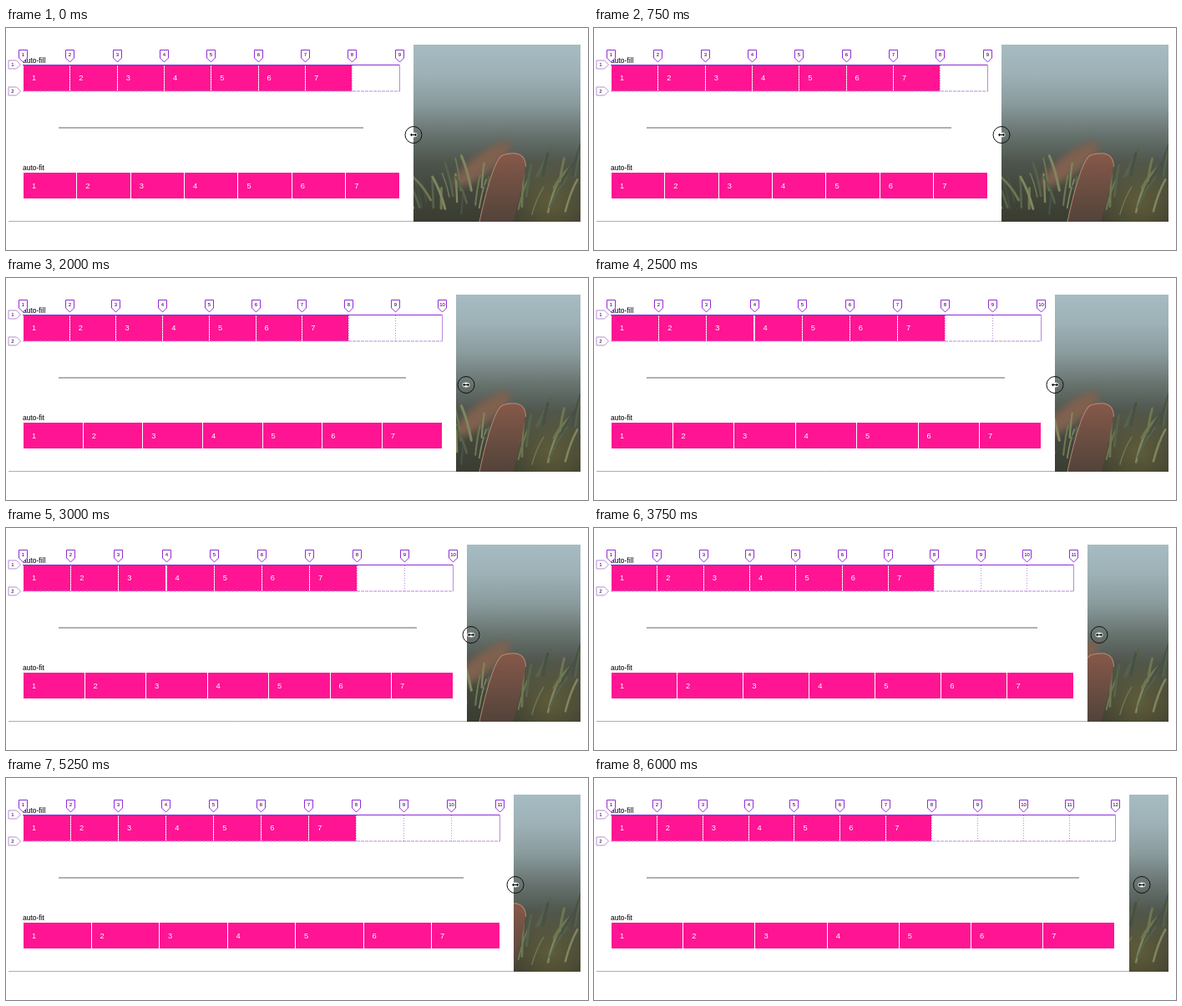
Recreate the animation shown at these times as an HTML page with a canvas. Size 697 by 267 pixels, loop 6.25 s.

```html
<!DOCTYPE html>
<html lang="en">
<head>
<meta charset="utf-8">
<title>auto-fill and auto-fit</title>
<style>
html, body { margin: 0; width: 100%; height: 100%; overflow: hidden; background: #fff; }
canvas { display: block; }
</style>
</head>
<body>
<canvas id="stage" width="697" height="267"></canvas>
<script>
const ctx = document.getElementById('stage').getContext('2d');
const LOOP = 6250, STEP = 250;
const LEFT = 20.5, MIN_COL = 53.5, COUNT = 7;
const PHOTO = { x: 488, y: 20, w: 200, h: 213 };
const PINK = '#ff1493', PURPLE = '#8f2bd6', PALE = '#b98adb';
const SANS = '"Liberation Sans", Arial, sans-serif';

// eased drag: how much of it is done at time t
function ease(t, start, length) {
  const p = Math.min(1, Math.max(0, (t - start) / length));
  return p * p * (3 - 2 * p);
}

// three pulls of the handle; the pane edge follows one step behind
function handleX(t) {
  return PHOTO.x + 64 * ease(t, 870, 1230) + 56 * ease(t, 2790, 1110) + 52 * ease(t, 5126, 1057);
}

function line(x1, y1, x2, y2, color, width = 1, dash = []) {
  ctx.strokeStyle = color;
  ctx.lineWidth = width;
  ctx.setLineDash(dash);
  ctx.beginPath();
  ctx.moveTo(x1, y1);
  ctx.lineTo(x2, y2);
  ctx.stroke();
  ctx.setLineDash([]);
}

function text(str, x, y, size, color = '#000', align = 'left') {
  ctx.font = size + 'px ' + SANS;
  ctx.textAlign = align;
  ctx.fillStyle = color;
  ctx.fillText(str, x, y);
}

// soft landscape: misty sky, dark ground, a brown stump and pale needles
function makePhoto() {
  const cv = document.createElement('canvas');
  cv.width = PHOTO.w;
  cv.height = PHOTO.h;
  const c = cv.getContext('2d');

  const sky = c.createLinearGradient(0, 0, 0, PHOTO.h);
  const tones = ['#a6bcc2', '#9db1b6', '#8a9b9d', '#687470', '#4d544c', '#42463b', '#3a3c31'];
  tones.forEach((tone, i) => sky.addColorStop(i / (tones.length - 1), tone));
  c.fillStyle = sky;
  c.fillRect(0, 0, PHOTO.w, PHOTO.h);

  const glow = c.createRadialGradient(165, 190, 0, 165, 190, 60);
  glow.addColorStop(0, 'rgba(116,108,58,.6)');
  glow.addColorStop(1, 'rgba(116,108,58,0)');
  c.fillStyle = glow;
  c.fillRect(100, 120, 100, 93);

  // blurred twig behind the stump
  c.filter = 'blur(4px)';
  c.fillStyle = '#80614f';
  c.beginPath();
  c.ellipse(82, 144, 42, 12, -0.65, 0, Math.PI * 2);
  c.fill();
  c.filter = 'none';

  let seed = 11;
  const rnd = () => (seed = (seed * 16807) % 2147483647) / 2147483647;
  const greens = ['#56624c', '#475145', '#6d7752', '#7f865f'];
  function needles(n, rise) {
    c.lineCap = 'round';
    for (let i = 0; i < n; i++) {
      const p = (i + rnd()) / n, x = p * PHOTO.w;
      const y = 205 - rise * (.5 + p) * rnd();
      const dx = (p - .45) * 30 + (rnd() - .5) * 22, dy = -24 - rnd() * 18;
      c.strokeStyle = greens[Math.floor(rnd() * greens.length)];
      c.lineWidth = 1.5 + rnd() * 2;
      c.beginPath();
      c.moveTo(x, y);
      c.quadraticCurveTo(x + dx * .4, y + dy * .6, x + dx, y + dy);
      c.stroke();
    }
  }
  needles(42, 38);

  const bark = c.createLinearGradient(0, 130, 0, PHOTO.h);
  bark.addColorStop(0, '#86594a');
  bark.addColorStop(1, '#52433a');
  c.fillStyle = bark;
  c.strokeStyle = '#bd8871';
  c.lineWidth = 2;
  c.beginPath();
  c.moveTo(79, PHOTO.h + 2);
  c.quadraticCurveTo(96, 136, 108, 133);
  c.quadraticCurveTo(133, 126, 134, 146);
  c.setLineDash([1.5, 1.5]);
  c.stroke();
  c.quadraticCurveTo(131, 170, 119, PHOTO.h + 2);
  c.fill();
  c.setLineDash([]);
  return cv;
}
const photo = makePhoto();

// tag with a pointed end; angle 0 points down
function badge(x, y, half, angle, label, color) {
  ctx.save();
  ctx.translate(x, y);
  ctx.rotate(angle);
  ctx.beginPath();
  ctx.moveTo(0, 0);
  ctx.lineTo(half, -5);
  ctx.lineTo(half, -14.5);
  ctx.lineTo(-half, -14.5);
  ctx.lineTo(-half, -5);
  ctx.closePath();
  ctx.fillStyle = '#fff';
  ctx.fill();
  ctx.strokeStyle = color;
  ctx.lineWidth = 1;
  ctx.stroke();
  ctx.translate(0, -9.5);
  ctx.rotate(-angle);
  text(label, 0, 2, 6, '#000', 'center');
  ctx.restore();
}

function items(pitch, y, h) {
  for (let i = 0; i < COUNT; i++) {
    const x = LEFT + i * pitch;
    const from = Math.round(x + .5), to = Math.round(x + pitch - .5);
    ctx.fillStyle = PINK;
    ctx.fillRect(from, y, to - from, h);
    text(i + 1, x + 10.5, y + h / 2 + 3.2, 9.3, '#fff');
  }
}

function fillGrid(right) {
  const n = Math.floor((right - LEFT) / MIN_COL);
  const pitch = (right - LEFT) / n;
  const lineX = i => Math.round(LEFT + i * pitch - .5) + .5;
  text('auto-fill', 20, 42, 8.5);
  items(pitch, 44, 32);
  for (let i = 1; i <= n; i++)
    line(lineX(i), 45, lineX(i), 76, i < COUNT ? '#f3a0d2' : PALE, 1, i < n ? [1, 2] : []);
  line(20, 44.5, right + .5, 44.5, PURPLE);
  line(20, 76, right + .5, 76, PALE, 1, [4, 1]);
  for (let i = 0; i <= n; i++) badge(lineX(i), 41, 5, 0, i + 1, PURPLE);
  badge(17.5, 44, 5, -Math.PI / 2, 1, PALE);
  badge(17.5, 76, 5, -Math.PI / 2, 2, PALE);
}

function cursor(x, y) {
  ctx.strokeStyle = '#111';
  ctx.lineWidth = 1;
  ctx.beginPath();
  ctx.arc(x, y, 10, 0, Math.PI * 2);
  ctx.stroke();
  ctx.fillStyle = 'rgba(255,255,255,.85)';
  ctx.beginPath();
  ctx.ellipse(x, y, 4.5, 3, 0, 0, Math.PI * 2);
  ctx.fill();
  line(x - 3, y, x + 3, y, '#000');
  ctx.fillStyle = '#000';
  for (const d of [-1, 1]) {
    ctx.beginPath();
    ctx.moveTo(x + 4 * d, y);
    ctx.lineTo(x + 1.8 * d, y - 2);
    ctx.lineTo(x + 1.8 * d, y + 2);
    ctx.fill();
  }
}

function draw(t) {
  const edge = Math.round(handleX(t - STEP));
  const right = edge - 17;
  ctx.fillStyle = '#fff';
  ctx.fillRect(0, 0, 697, 267);

  fillGrid(right);
  line(63, 120, right - 43, 120, '#b0b0b0', 2);
  text('auto-fit', 20, 171, 8.5);
  items((right - LEFT) / COUNT, 174, 31);
  line(3, 232.5, edge, 232.5, '#adadad');

  ctx.save();
  ctx.beginPath();
  ctx.rect(edge, PHOTO.y, PHOTO.x + PHOTO.w - edge, PHOTO.h);
  ctx.clip();
  ctx.drawImage(photo, PHOTO.x, PHOTO.y);
  ctx.restore();
  cursor(Math.round(handleX(t)), 128.5);
}

function tick() {
  const t = performance.now() % LOOP;
  draw(Math.floor(t / STEP) * STEP);
  requestAnimationFrame(tick);
}
tick();
</script>
</body>
</html>
```
